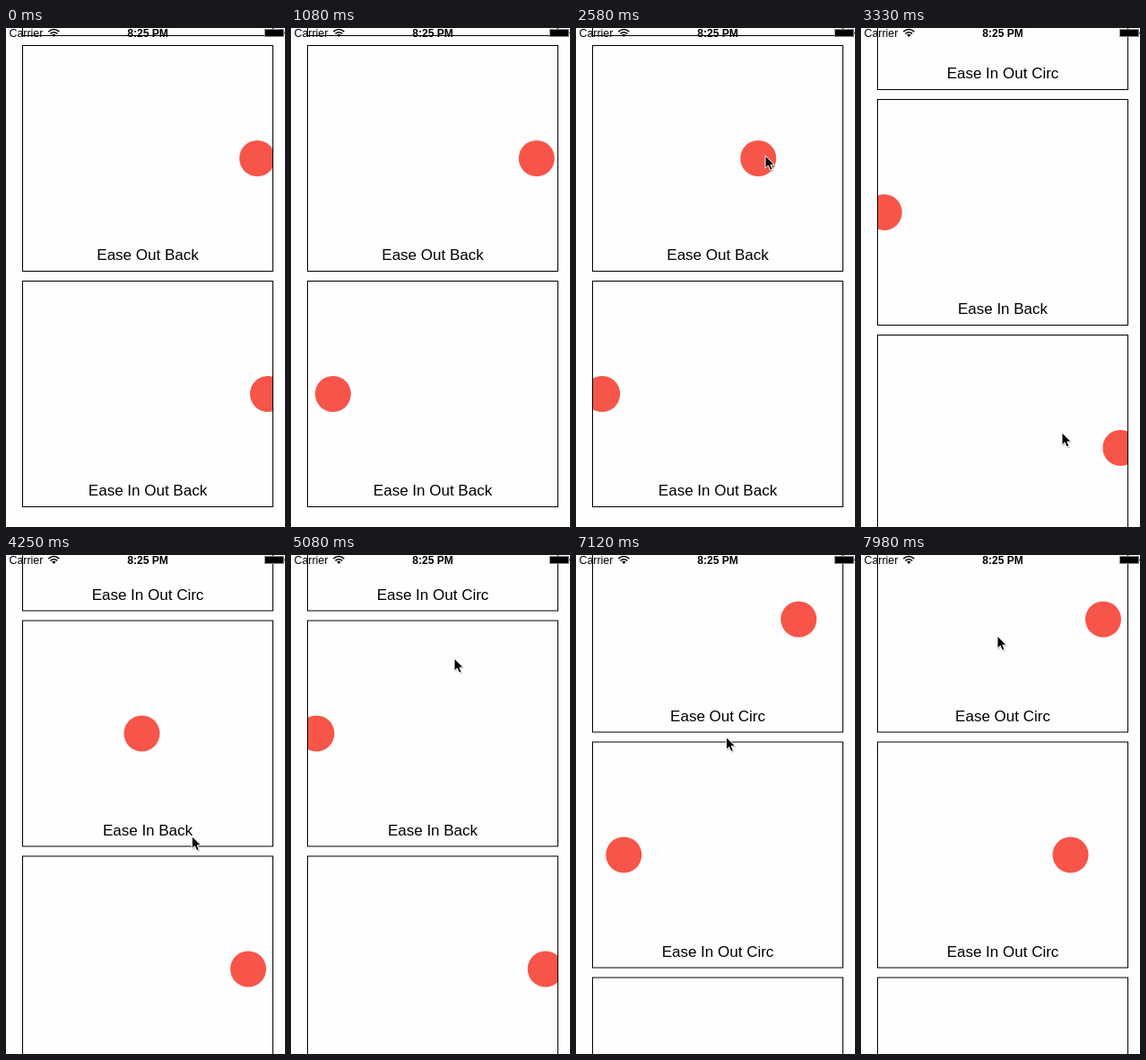
An HTML page that plays this animation: 311 px wide and 555 px high, repeating every 8000 ms.

```html
<!DOCTYPE html>
<html lang="en">
<head>
<meta charset="utf-8">
<title>Easing list</title>
<style>
  html, body { margin: 0; width: 100%; height: 100%; overflow: hidden; background: #fefefe; }
  svg { display: block; width: 311px; height: 555px; }
  text { font-family: "Liberation Sans", Arial, sans-serif; fill: #000; }
  .label { font-size: 17px; text-anchor: middle; }
  .carrier { font-size: 12.4px; }
  .clock { font-size: 12px; font-weight: bold; text-anchor: middle; }
  .card { fill: none; stroke: #000; }
  .ball { fill: #f75549; }
</style>
</head>
<body>
<svg viewBox="0 0 311 555">
  <defs>
    <clipPath id="inside"><rect x="19" y="1" width="278" height="250"/></clipPath>
  </defs>
  <g id="list"></g>
  <text class="carrier" x="3.5" y="9.5">Carrier</text>
  <text class="clock" x="158" y="9.5">8:25 PM</text>
  <g fill="none" stroke="#000" stroke-width="1.5">
    <path d="M47.3 4.1Q53.3 -1.1 59.3 4.1"/>
    <path d="M49.4 6.4Q53.3 3 57.2 6.4"/>
  </g>
  <path d="M53.3 10L51 7.6Q53.3 5.8 55.6 7.6Z"/>
  <rect x="288.5" y="1.5" width="21" height="8" stroke="#888"/>
  <rect x="310" y="4" width="1" height="3" fill="#888"/>
  <g id="cursor">
    <path d="M1 1.5V15.5L4.3 12.5L6.5 17.5L9 16.4L6.9 11.6H11.3Z" opacity=".22"/>
    <path d="M0 0V14L3.2 11L5.4 16L8 14.9L5.9 10.1H10.3Z" stroke="#fff"/>
  </g>
</svg>
<script>
const LOOP = 8000, RUN = 1850;
const PITCH = 262, LEFT = 47, TRAVEL = 223;
const BACK = 1.70158;

const clamp = (v, max = 1) => Math.min(Math.max(v, 0), max);
const smooth = k => k * k * (3 - 2 * k);

const back = s => u => u * u * ((s + 1) * u - s);
const circ = u => 1 - Math.sqrt(1 - u * u);
const easeOut = ease => u => 1 - ease(1 - u);
const easeInOut = ease => u => u < .5 ? ease(2 * u) / 2 : 1 - ease(2 - 2 * u) / 2;

const cards = [
  { label: "Ease Out Circ", ease: easeOut(circ), start: 5765, run: 2040 },
  { label: "Ease In Out Circ", ease: easeInOut(circ), start: 2920 },
  { label: "Ease In Back", ease: back(BACK), start: 2460 },
  { label: "Ease Out Back", ease: easeOut(back(BACK)), start: 365 },
  { label: "Ease In Out Back", ease: easeInOut(back(BACK * 1.525)), start: 414 }
];

// Pointer moves; the ones with a scroll also drag the list
const origin = { x: -14, y: 121 };
const moves = [
  { at: 1180, span: 900, x: 225, y: 21 },
  { at: 2600, span: 670, x: 13, y: 308, scroll: 322 },
  { at: 3340, span: 280, x: 0, y: -6, scroll: -6.5 },
  { at: 3620, span: 1460, x: -42, y: -329 },
  { at: 5920, span: 410, x: 25, y: 379, scroll: 387.5 },
  { at: 6330, span: 270, x: 0, y: -2, scroll: 9.5 },
  { at: 6600, span: 800, x: -55, y: -402 }
];

const moved = (axis, t) => moves.reduce(
  (sum, m) => sum + (m[axis] || 0) * smooth(clamp((t - m.at) / m.span)), 0);

// The balls stall for a moment when the first drag begins
const ballTime = t => t - clamp(t - 2600, 195);

function progress({ start, run = RUN }, t) {
  const runs = (ballTime(t) - start) / run;
  return runs - Math.floor(runs);
}

function add(parent, tag, attrs) {
  const node = document.createElementNS("http://www.w3.org/2000/svg", tag);
  for (const name in attrs) node.setAttribute(name, attrs[name]);
  return parent.appendChild(node);
}

const list = document.getElementById("list");
const cursor = document.getElementById("cursor");

const balls = cards.map(({ label }, i) => {
  const card = add(list, "g", { transform: `translate(0 ${19 + (i - 3) * PITCH})` });
  const ball = add(add(card, "g", { "clip-path": "url(#inside)" }), "circle", { class: "ball", cy: 126, r: 20 });
  add(card, "rect", { class: "card", x: 18.5, y: .5, width: 279, height: 251 });
  add(card, "text", { class: "label", x: 158, y: 239 }).textContent = label;
  return ball;
});

function draw(t) {
  list.setAttribute("transform", `translate(0 ${moved("scroll", t)})`);
  cards.forEach((card, i) => {
    balls[i].setAttribute("cx", LEFT + TRAVEL * card.ease(progress(card, t)));
  });
  cursor.setAttribute("transform", `translate(${origin.x + moved("x", t)} ${origin.y + moved("y", t)})`);
}

const start = performance.now();
function tick(now) {
  draw(Math.max(0, now - start) % LOOP);
  requestAnimationFrame(tick);
}
draw(0);
requestAnimationFrame(tick);
</script>
</body>
</html>
```
